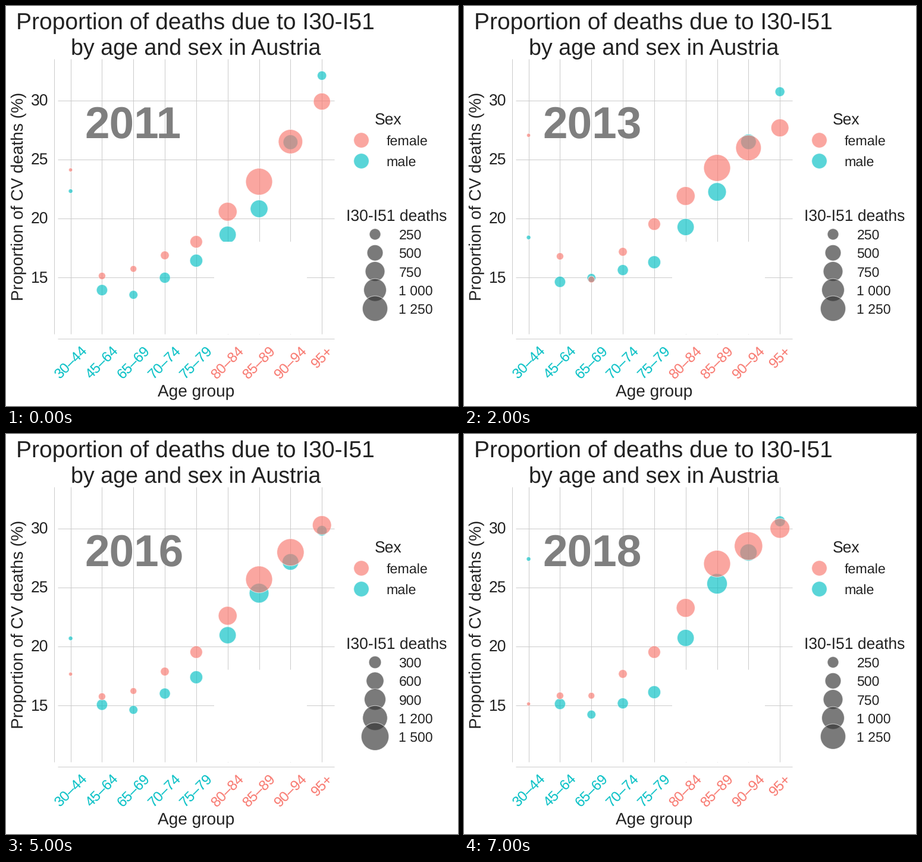
Write a matplotlib script that moves like this. It is 760 px wide and 672 px high and loops after 8000 ms.

```python
import numpy as np
import matplotlib.pyplot as plt
from matplotlib.animation import FuncAnimation
from matplotlib.patches import Circle, Rectangle

W, H, DPI = 760, 672, 100
PT = 72 / DPI
INK, GRID, GREY = "#222222", "#cbcbcb", "#7f7f7f"
FEMALE, MALE = "#F8766D", "#00BFC4"
ALPHA = 0.65

AGES = ["30–44", "45–64", "65–69", "70–74", "75–79",
        "80–84", "85–89", "90–94", "95+"]
XS = 108.6 + 52.82 * np.arange(len(AGES))
YEARS = range(2011, 2019)
WIDE_KEY_YEARS = (2012, 2015, 2016, 2017)

# Percentages at a few years (rows) and age groups (columns)
KEY_YEARS = [2011, 2012, 2015, 2018]
KEY_AGES = [0, 1, 2, 4, 6, 8]
RATE_F = [[24.1, 15.1, 15.7, 18.0, 23.1, 29.9],
          [31.1, 17.3, 14.0, 19.5, 23.9, 26.3],
          [18.9, 15.7, 16.4, 19.5, 25.0, 30.4],
          [15.1, 15.8, 15.8, 19.5, 27.0, 30.0]]
RATE_M = [[22.3, 13.9, 13.5, 16.4, 20.8, 32.1],
          [18.9, 14.4, 15.0, 15.4, 21.3, 31.4],
          [17.3, 15.0, 14.8, 18.0, 24.1, 29.4],
          [27.4, 15.1, 14.2, 16.1, 25.3, 30.6]]

# Deaths per age group in the first year
DEATHS_F = [28, 100, 84, 145, 300, 680, 1400, 1150, 560]
DEATHS_M = [36, 240, 148, 230, 320, 560, 600, 420, 165]


def y_of(rate):
    return 158.5 - (rate - 30) * 19.8


def radius(deaths):
    return 0.6 * np.sqrt(deaths)


def rates_at(keys, year):
    row = [np.interp(year, KEY_YEARS, col) for col in zip(*keys)]
    return np.interp(range(len(AGES)), KEY_AGES, row)


def deaths_at(start, year, oldest):
    """The oldest groups, from index `oldest` on, grow by 35 % overall."""
    t = (year - YEARS[0]) / (len(YEARS) - 1)
    deaths = np.array(start, float)
    deaths[oldest:] *= 1 + 0.35 * t
    return deaths


def label(x, y, s, px, color=INK, **kw):
    """Text with its baseline at pixel row y."""
    return ax.text(x, y, s, fontsize=px * PT, color=color, va="baseline",
                   rotation_mode="anchor", **kw)


def line(xs, ys):
    ax.plot(xs, ys, color=GRID, lw=PT, zorder=1, solid_capstyle="butt")


def bubble(x, y, r, color, z):
    c = Circle((x, y), r, facecolor=color, edgecolor="white", lw=PT,
               alpha=ALPHA, zorder=z)
    return ax.add_patch(c)


plt.rcParams["font.family"] = "Liberation Sans"
plt.rcParams["text.hinting"] = "none"
fig = plt.figure(figsize=(W / DPI, H / DPI), dpi=DPI, facecolor="white")
ax = fig.add_axes([0, 0, 1, 1])
ax.set_xlim(0, W)
ax.set_ylim(H, 0)
ax.axis("off")

# Grid and axis lines, snapped to whole pixels
for x in [81, *XS]:
    line([x, x], [89, 551])
for y in [159, 258, 357, 456, 559]:
    line([87, 552], [y, y])
ax.add_patch(Rectangle((350, 396), 156, 155, color="white", lw=0, zorder=4))

# Titles and axis labels
label(318, 39, "Proportion of deaths due to I30-I51", 39, ha="center")
label(319.5, 82, "by age and sex in Austria", 37.6, ha="center")
label(320, 656.5, "Age group", 28, ha="center")
label(29, 320, "Proportion of CV deaths (%)", 28, ha="center", rotation=90)
for v in (15, 20, 25, 30):
    label(71, y_of(v) + 9.5, str(v), 26.5, ha="right")
for i, (x, age) in enumerate(zip(XS, AGES)):
    y = 604 if len(age) > 3 else 595.5
    label(x + 5.5, y, age, 24, MALE if i < 5 else FEMALE,
          ha="center", rotation=45)

# Legends
label(620, 199.5, "Sex", 26.5)
for y, name, color in [(225.5, "female", FEMALE), (260.5, "male", MALE)]:
    bubble(597.5, y, 12.8, color, 2)
    label(639.5, y + 8.5, name, 23.3)
label(571.5, 360.5, "I30-I51 deaths", 26.5)
KEY_YS = 383.5 + 31.2 * np.arange(5)
keys = [bubble(620.5, y, 1, "#333333", 2) for y in KEY_YS]
key_labels = [label(660.5, y + 8.5, "", 23) for y in KEY_YS]

year_text = label(132, 222, "", 74.7, GREY, weight="bold", zorder=5)
males = [bubble(x, 0, 1, MALE, 2) for x in XS]
females = [bubble(x, 0, 1, FEMALE, 3) for x in XS]


def place(dots, rates, deaths):
    for dot, x, y, r in zip(dots, XS, y_of(rates), radius(deaths)):
        dot.center = x, y
        dot.set_radius(r)


def update(i):
    year = YEARS[i]
    place(females, rates_at(RATE_F, year), deaths_at(DEATHS_F, year, 7))
    place(males, rates_at(RATE_M, year), deaths_at(DEATHS_M, year, 6))
    year_text.set_text(str(year))

    step = 300 if year in WIDE_KEY_YEARS else 250
    for k, (key, text) in enumerate(zip(keys, key_labels), 1):
        key.set_radius(radius(step * k))
        text.set_text(f"{step * k:,}".replace(",", " "))
    return [*females, *males, *keys, *key_labels, year_text]


anim = FuncAnimation(fig, update, frames=len(YEARS), interval=1000,
                     repeat=True, blit=False)
plt.show()
```
